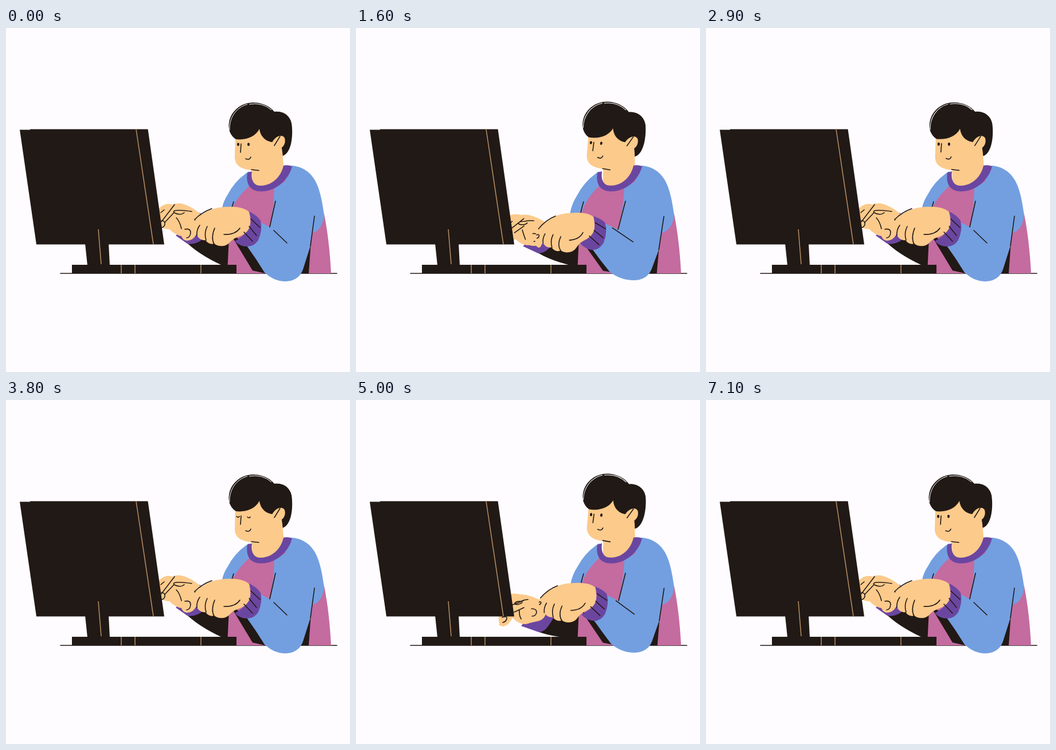
Recreate the animation shown at these times as an HTML page. Size 600 px wide and 600 px high, loop 7.2 s.

```html
<!DOCTYPE html>
<html lang="en">
<head>
<meta charset="utf-8">
<title>Typing at the desk</title>
<style>
html, body { margin: 0; width: 100%; height: 100%; overflow: hidden; background: #fefcff; }
svg { display: block; width: 100vw; height: 100vh; }
.ink { fill: #211915; }
.skin { fill: #fcca8b; }
.blue { fill: #739fe0; }
.pink { fill: #c46ba0; }
.purple { fill: #6b46a0; }
.line { fill: none; stroke: #211915; stroke-width: 1.6; stroke-linecap: round; stroke-linejoin: round; }
.tan { fill: none; stroke: #b98f66; stroke-width: 1.5; }
</style>
</head>
<body>
<svg viewBox="0 0 600 600">
  <path class="line" d="M95,428H577"/>

  <path id="farArm" class="ink"/>
  <path id="farCuff" class="purple"/>
  <path id="farHand" class="skin"/>
  <path id="farLines" class="line"/>

  <path class="pink" d="M386,428L388,385L392,318L402,296L426,268L470,270L500,260L540,300L555,325Q564,370 567,428Z"/>
  <path id="farSleeve" class="blue"/>
  <path class="line" d="M397,303Q394,312 392,322"/>
  <path id="gaps" class="ink"/>

  <g id="head">
    <path class="ink" d="M466,147C482,143 495,152 498,166C501,184 499,217 483,223L468,215Z"/>
    <path class="skin" d="M400,185L399,226C400,240 409,246 429,248L430,276L466,275L485,250L482,216L478,190L466,175L430,165Z"/>
    <path class="ink" d="M401,194C391,188 387,176 389,165C392,145 410,130 431,130C446,130 460,136 468,146C482,144 495,152 498,168L496,190L484,200L467,199C455,199 444,191 442,176C435,190 418,196 401,194Z"/>
    <path class="skin" d="M464,200C469,189 482,184 486,192C489,202 482,212 472,211Z"/>
    <path d="M390,178C389,158 400,139 421,133M424,133Q447,129 463,143" fill="none" stroke="#fff" stroke-width="1"/>
    <path class="line" d="M478,189L468,205M410,202L409,217M418,228Q425,231 427,225M428,247L441,248.500"/>
    <g id="open" class="ink">
      <ellipse cx="405" cy="203" rx="2" ry="2.800"/>
      <ellipse cx="423" cy="203" rx="2" ry="2.800"/>
    </g>
    <path id="shut" class="line" d="M402,203Q405,206 407,203M421,204Q424,207 426,204"/>
  </g>

  <path id="sleeve" class="blue"/>
  <path class="purple" d="M421,252L429,250C427,264 431,275 444,275C462,275 479,262 484,240Q491,238 499,241C493,266 470,285 445,285C424,285 418,270 421,252Z"/>
  <path id="sleeveLines" class="line"/>
  <path id="cuff" class="purple"/>
  <path id="hand" class="skin"/>
  <path id="handLines" class="line"/>

  <path class="ink" d="M115,413H402V428H115ZM138,376H179L181,414H142ZM24,177.500H42V176.500H247.500L276,377.500H53Z"/>
  <path class="tan" d="M227,177L257,377M161,351L166,412M201,413V428M225,413V428M340,413V428"/>
</svg>
<script>
const LOOP = 7200, CYCLE = 3600, STEP = 100;
const el = id => document.getElementById(id);

// Two poses per part, blended number by number.
const nearPoses = {
  farSleeve: [
    "M424,250Q400,265 387,290Q379,302 377,314L392,324Q397,300 426,274Z",
    "M424,250Q400,265 384,294Q373,312 369,334L391,338Q397,300 426,274Z"],
  gaps: [
    "M392,360L430,423L452,428L424,378ZM532,372L528,428L514,428L518,410Z",
    "M396,384L432,424L440,424L412,392ZM525,394L521,428L508,428L514,412Z"],
  sleeve: [
    "M468,279Q467,315 460,347L442,338L438,372L420,380Q436,402 450,425Q466,442 488,442Q511,441 518,421L531,380L535,357Q551,353 555,327C550,290 544,268 530,254Q516,241 498,240L486,268Z",
    "M468,279Q465,315 455,357L424,343L421,378L404,392Q416,410 434,425Q456,438 481,438Q505,438 513,420L525,394L532,357Q551,353 555,327C550,290 544,268 530,254Q516,241 498,240L486,268Z"],
  sleeveLines: [
    "M470,302L460,347M467,353L490,375M538,328L531,380",
    "M470,302L454,356M426,344L476,371M536,329L525,394"],
  cuff: [
    "M424,320Q437,326 444,336Q448,352 440,370Q432,382 420,381Q408,381 399,372Q416,362 424,350Q430,335 424,320Z",
    "M403,337Q415,338 424,343Q430,360 423,380Q415,394 404,394Q392,392 381,379Q396,373 402,362Q408,350 403,337Z"],
  hand: [
    "M424,321C415,312 398,311 382,312C362,313 345,320 331,333C326,338 324,342 324,348C324,354 326,359 329,360C331,360 331,358 332,357C333,366 341,371 348,370C352,376 358,378 363,376C370,382 384,382 390,374C396,368 400,366 406,364Q428,356 426,334Z",
    "M404,339C397,334 385,333 370,334C350,334 335,340 325,349C312,358 303,366 301,384C298,400 302,409 309,408C315,406 316,396 319,388C322,396 328,398 334,396C338,403 345,404 351,401C358,406 370,404 376,396C379,388 383,382 388,378Q408,367 405,350Z"],
  handLines: [
    "M329,334Q342,321 359,315M338,344Q332,352 333,362M351,346Q345,358 349,370M364,349Q357,366 363,377M408,349Q400,361 380,360M329,334Q329,334 330,334Q330,335 329,335M427,333L443,348M424,346L437,362M415,356L430,372",
    "M307,368Q318,350 336,342M321,375Q318,382 319,389M336,376Q331,386 334,396M350,380Q343,392 351,401M383,365Q378,378 364,381M300,390Q307,386 308,392Q307,400 301,401M407,347L427,353M406,361L425,370M398,370L417,384"]
};
const farPoses = {
  farArm: [
    "M306,368L318,377Q342,399 388,419L392,370L355,345Z",
    "M300,394L320,405Q345,414 388,416L392,374L346,372Z"],
  farCuff: [
    "M338,322L355,338Q350,368 334,374Q325,378 316,376L296,362Z",
    "M325,350L348,374Q340,388 334,396Q328,404 319,405L288,394Z"],
  farHand: [
    "M262,322C268,310 280,304 290,308C304,302 320,308 345,329L332,360Q326,371 316,371Q308,370 306,363Q295,361 285,351Q277,351 270,347L262,340Z",
    "M246,352C254,340 272,335 286,339C300,338 316,347 335,354L330,376Q326,384 316,386Q306,388 300,390Q287,394 273,380Q266,394 256,395Q250,393 252,387L241,381Z"],
  farLines: [
    "M270,322L276,317M271,338L294,308M324,320Q311,318 302,318Q290,318 293,322Q304,328 311,322M293,322L277,339M271,336Q278,336 277,343Q275,348 271,348M297,331Q303,337 306,350M312,351Q322,349 322,357Q321,366 315,366",
    "M262,356L270,352M271,358L292,350M300,348Q294,348 288,351Q276,351 277,356Q284,358 290,353M293,362L276,370M255,379Q264,376 263,381Q262,387 256,388M285,367Q284,375 288,382M306,364Q315,364 315,370Q314,377 307,377"]
};

// Key times inside one cycle: [ms, value]
const nearKeys = [[0, 0], [400, 0], [600, .33], [900, 1], [1000, 1], [1400, .33], [2050, 1], [2300, .9], [2550, .33], [2800, 0], [3600, 0]];
const farKeys = [[0, 0], [250, 0], [600, 1], [900, .05], [1000, .05], [1400, 1], [1850, 0], [2050, 0], [2300, .2], [2550, 1], [2800, 0], [3600, 0]];
const headKeys = [[0, 0], [200, 0], [900, .65], [1400, 1], [2300, .65], [3200, 0], [3600, 0]];
const blinks = [900, 3800, 6700];

function track(keys, t) {
  const i = keys.findIndex((k, n) => n && t <= k[0]);
  const [t0, a] = keys[i - 1], [t1, b] = keys[i];
  const k = (t - t0) / (t1 - t0);
  return a + (b - a) * k * k * (3 - 2 * k);
}

function blend([a, b], k) {
  const to = b.match(/[\d.]+/g);
  let i = 0;
  return a.replace(/[\d.]+/g, n => (+n + (to[i++] - n) * k).toFixed(2));
}

function pose(parts, k) {
  for (const id in parts) el(id).setAttribute("d", blend(parts[id], k));
}

function draw(now) {
  const t = Math.floor((now % LOOP) / STEP) * STEP;
  const p = t % CYCLE;
  pose(nearPoses, track(nearKeys, p));
  pose(farPoses, track(farKeys, p));
  const nod = track(headKeys, p);
  el("head").setAttribute("transform", `translate(${nod} ${-1.5 * nod}) rotate(${3.4 * nod} 435 270)`);
  const closed = blinks.some(b => Math.abs(t - b) < STEP);
  el("open").style.display = closed ? "none" : "";
  el("shut").style.display = closed ? "" : "none";
}

const start = performance.now();
function tick() {
  draw(performance.now() - start);
  requestAnimationFrame(tick);
}
tick();
</script>
</body>
</html>
```
